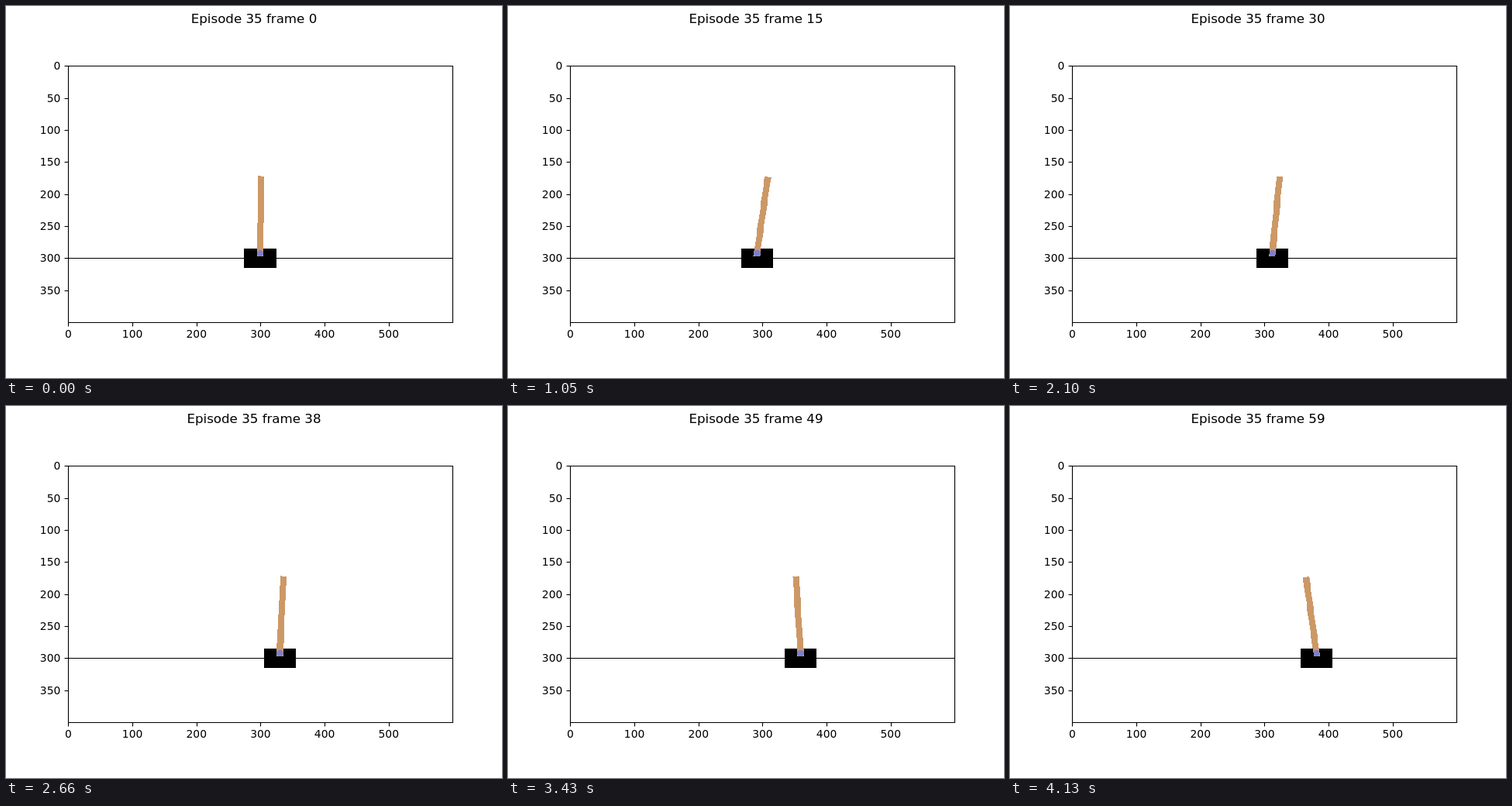
An HTML page with a canvas for the animation above (4200 ms loop, 640x480 px).

```html
<!DOCTYPE html>
<html lang="en">
<head>
<meta charset="utf-8">
<title>Cart and pole</title>
<style>
  html, body { margin: 0; width: 100%; height: 100%; overflow: hidden; background: #fff; }
  canvas, svg { position: absolute; left: 0; top: 0; width: 640px; height: 480px; }
  text { font: 13.889px "DejaVu Sans", sans-serif; fill: #000; }
  #title { font-size: 16.667px; text-anchor: middle; }
  .x { text-anchor: middle; }
  .y { text-anchor: end; }
  path { fill: none; stroke: #000; stroke-width: 1.111; }
</style>
</head>
<body>
<canvas id="scene" width="640" height="480"></canvas>
<svg id="axes" viewBox="0 0 640 480">
  <path d="M80.5 77.5H576.5V408.5H80.5Z"/>
  <text id="title" x="320" y="22"></text>
</svg>
<script>
const STEP = 70, COUNT = 60;
const LEFT = 80, TOP = 77.07, SCALE = 496 / 600;
const AXLE_Y = 292.5;

// step, cart centre, pole angle in radians
const KEYS = [
  [0, 300, 0.0105], [4, 296.6, 0.052], [8, 292.1, 0.1065],
  [13, 290.8, 0.14], [17, 294, 0.136], [22, 300, 0.123],
  [30, 312.7, 0.096], [38, 330.8, 0.045], [49, 360, -0.063],
  [55, 375, -0.115], [59, 381.6, -0.137]
];

const ctx = document.getElementById('scene').getContext('2d');
const axes = document.getElementById('axes');
const title = document.getElementById('title');

const toX = u => LEFT + u * SCALE;
const toY = v => TOP + v * SCALE;
const snap = p => Math.floor(p + 0.5) + 0.5;

function add(name, attrs, label) {
  const el = document.createElementNS('http://www.w3.org/2000/svg', name);
  for (const k in attrs) el.setAttribute(k, attrs[k]);
  if (label !== undefined) el.textContent = label;
  axes.appendChild(el);
}

function buildTicks() {
  for (let v = 0; v < 600; v += 100) {
    const x = toX(v + 0.5);
    add('path', { d: `M${snap(x)} 408.5v5` });
    add('text', { class: 'x', x, y: 428 }, v);
  }
  for (let v = 0; v < 400; v += 50) {
    const y = toY(v + 0.5);
    add('path', { d: `M80.5 ${snap(y)}h-5` });
    add('text', { class: 'y', x: 70.3, y: Math.round(y + 5) }, v);
  }
}

// Smooth curve through the keys
function slope(i, col) {
  const a = KEYS[Math.max(i - 1, 0)], b = KEYS[Math.min(i + 1, KEYS.length - 1)];
  return (b[col] - a[col]) / (b[0] - a[0]);
}

function curve(n, col) {
  let i = 0;
  while (i < KEYS.length - 2 && n >= KEYS[i + 1][0]) i++;
  const a = KEYS[i], b = KEYS[i + 1], h = b[0] - a[0];
  const t = (n - a[0]) / h, t2 = t * t, t3 = t2 * t;
  return (2 * t3 - 3 * t2 + 1) * a[col] + (t3 - 2 * t2 + t) * h * slope(i, col)
       + (3 * t2 - 2 * t3) * b[col] + (t3 - t2) * h * slope(i + 1, col);
}

// Hard-edged pole and axle, sampled on the 600 by 400 grid
function drawPole(cx, angle) {
  const s = Math.sin(angle), c = Math.cos(angle);
  const mid = Math.round(toX(cx));
  for (let y = 214; y < 328; y++) {
    const dy = Math.floor((y + 0.5 - TOP) / SCALE) + 0.5 - AXLE_Y;
    for (let x = mid - 30; x < mid + 30; x++) {
      const dx = Math.floor((x + 0.5 - LEFT) / SCALE) + 0.5 - cx;
      const along = dx * s - dy * c, across = dx * c + dy * s;
      const axle = dx * dx + dy * dy < 25;
      const pole = along >= -5 && along <= 120 && Math.abs(across) <= 5;
      if (!axle && !pole) continue;
      ctx.fillStyle = axle ? '#7f7fcc' : '#cc9966';
      ctx.fillRect(x, y, 1, 1);
    }
  }
}

function draw(n) {
  const cx = curve(n, 1);
  const x0 = Math.round(toX(cx - 25)), x1 = Math.round(toX(cx + 25));
  ctx.fillStyle = '#fff';
  ctx.fillRect(0, 0, 640, 480);
  ctx.fillStyle = '#000';
  ctx.fillRect(80, 325, 496, 1);
  ctx.fillRect(x0, 313, x1 - x0, 25);
  drawPole(cx, curve(n, 2));
  title.textContent = 'Episode 35 frame ' + n;
}

let shown = -1;
const start = performance.now();

function tick() {
  let n = Math.floor((performance.now() - start) / STEP) % COUNT;
  if (n === 31) n = 30; // this step is held
  if (n !== shown) draw(shown = n);
  requestAnimationFrame(tick);
}

buildTicks();
tick();
</script>
</body>
</html>
```
